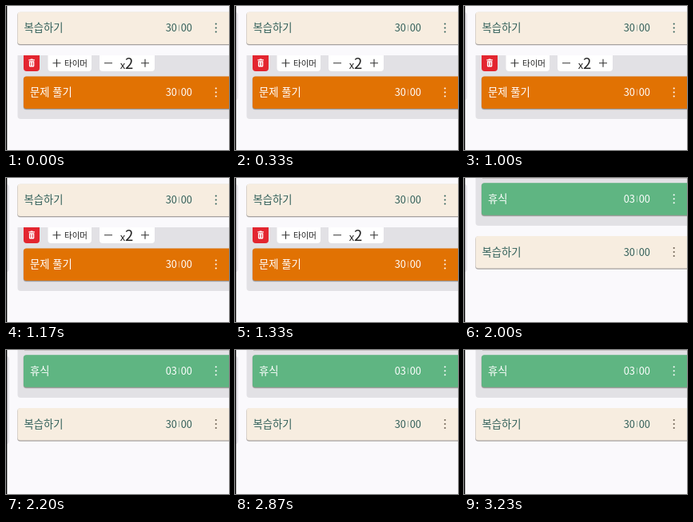
An HTML page for the animation above (3260 ms loop, 279 by 181 pixels).

```html
<!DOCTYPE html>
<html lang="ko">
<head>
<meta charset="utf-8">
<style>
html, body { margin: 0; width: 100%; height: 100%; overflow: hidden; background: #faf9fc; }
svg { display: block; width: 279px; height: 181px; }
text { font-family: "Noto Sans CJK KR", "Noto Sans CJK", "Noto Sans CJK JP", sans-serif; }
.title { font-size: 13.3px; font-weight: 500; }
.time { font-size: 12.8px; }
</style>
</head>
<body>
<svg id="stage" viewBox="0 0 279 181"></svg>
<script>
const LOOP = 3260, SCROLL_AT = 1830, EDGE_ON = 30, EDGE_OFF = 3230;
const CREAM = ['#f7ede0', '#315f59'];

const box = (x, y, w, h, r, fill) =>
  `<rect x="${x}" y="${y}" width="${w}" height="${h}" rx="${r}" fill="${fill}"/>`;

const line = (d, color, width = 1.1) =>
  `<path d="${d}" fill="none" stroke="${color}" stroke-width="${width}"/>`;

// Button whose top is cut off by the scrolling list
const button = (x, w, fill) =>
  `<path d="M${x} 62h${w}v16q0 4-4 4h${8 - w}q-4 0-4-4z" fill="${fill}"/>`;

function card(x, y, [fill, ink], title, min, sec, dot = ink) {
  const base = y + 24.5;
  const dots = [15, 20, 25].map(d =>
    `<circle cx="262.7" cy="${y + d}" r="1.05" fill="${dot}"/>`).join('');
  return box(x - .5, y + .2, 280, 41.8, 4, '#77706b55') +
    box(x, y + .8, 280, 40.6, 3.5, '#665f5a66') +
    box(x, y, 280, 40.5, 3.5, fill) +
    `<g fill="${ink}"><text class="title" x="${x + 8}" y="${base}">${title}</text>
     <text class="time" x="199.7" y="${base}">${min}</text>
     <text class="time" x="218.7" y="${base}">${sec}</text></g>` +
    line(`M216.5 ${y + 16}v8`, ink + '99', .8) + dots;
}

const trash = `<path d="M28.3 67.3h2l.6-.8h2.4l.6.8h2v1.2h-7.6zM28.9 69.3h6.4v6q0 1.2-1.2 1.2h-4q-1.2 0-1.2-1.2z" fill="#fff"/>` +
  line('M30.8 70.6v4.4M33.4 70.6v4.4', '#e3252f', .9);

const upper = card(14.5, 7.5, CREAM, '복습하기', '30', '00') +
  `<path d="M14.5 62H279v80H18.5q-4 0-4-4z" fill="#e2e1e5"/>` +
  button(22, 20, '#e3252f') + trash +
  button(52.5, 54.5, '#fff') + button(117, 69, '#fff') +
  line('M58.5 71.8h10M63.5 66.8v10M123 71.8h10M169 71.8h10M174 66.8v10', '#333') +
  `<g fill="#222"><text x="73" y="75.5" font-size="10.5">타이머</text>
   <text x="142.7" y="79" font-size="13">x</text>
   <text x="149" y="79" font-size="18.5">2</text></g>` +
  card(22, 88.5, ['#e17203', '#ffffff'], '문제 풀기', '30', '00');

const lower = `<path d="M14.5 0H279v60H18.5q-4 0-4-4z" fill="#e2e1e5"/>` +
  box(23, -1, 256, 1.7, 0, '#b9b4b2') +
  card(22, 6.3, ['#5fb582', '#ffffff'], '휴식', '03', '00') +
  card(14.5, 73, CREAM, '복습하기', '30', '00', '#6b5f50');

stage.innerHTML = box(0, 0, 279, 181, 0, '#faf9fc') +
  `<g id="top">${upper}</g><g id="bottom">${lower}</g>
   <path id="edge" d="M1 8q3 0 3 4v102q0 4-3 4z" fill="#e9e7ec"/>` +
  box(0, 0, 1.3, 181, 0, '#000');

const parts = ['top', 'bottom', 'edge'].map(id => document.getElementById(id));
const start = performance.now();

function draw(now) {
  const t = Math.max(0, now - start) % LOOP;
  const shown = [t < SCROLL_AT, t >= SCROLL_AT, t >= EDGE_ON && t < EDGE_OFF];
  parts.forEach((part, i) => part.style.display = shown[i] ? '' : 'none');
  requestAnimationFrame(draw);
}
draw(start);
</script>
</body>
</html>
```
